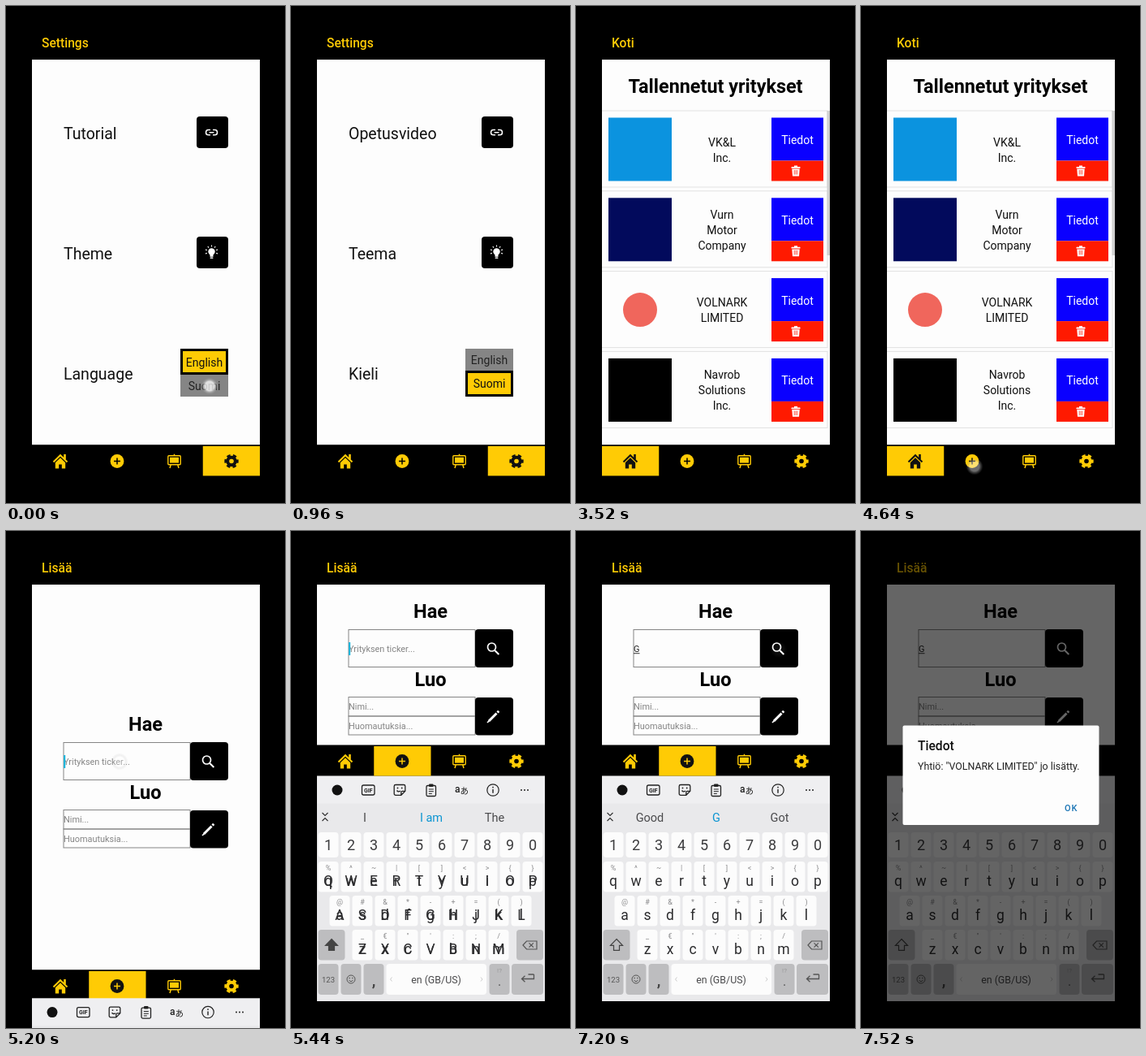
Animation of 344x612 px, one loop 8000 ms. Source, as an HTML page:

```html
<!DOCTYPE html>
<html lang="fi">
<head>
<meta charset="utf-8">
<style>
html, body { margin: 0; width: 100%; height: 100%; overflow: hidden; background: #000; }
svg { display: block; width: 344px; height: 612px; font-family: Roboto, "Noto Sans CJK JP", "Noto Sans CJK", sans-serif; }
</style>
</head>
<body>
<svg id="stage" viewBox="0 0 344 612" xmlns="http://www.w3.org/2000/svg"></svg>
<script>
const LOOP = 8000, YELLOW = '#ffcb05', KEY = '#fcfcfc', FN = '#bdbdbf';
const esc = s => s.replace(/&/g, '&amp;').replace(/</g, '&lt;');
const text = (x, y, s, size, fill = '#111', extra = '') =>
  `<text x="${x}" y="${y}" font-size="${size}" fill="${fill}" ${extra}>${esc(s)}</text>`;
const mid = (x, y, s, size, fill, extra = '') => text(x, y, s, size, fill, 'text-anchor="middle" ' + extra);
const rect = (x, y, w, h, fill, r = 0, extra = '') =>
  `<rect x="${x}" y="${y}" width="${w}" height="${h}" rx="${r}" fill="${fill}" ${extra}/>`;
const line = (d, color, w = 1.2, extra = '') =>
  `<path d="${d}" fill="none" stroke="${color}" stroke-width="${w}" ${extra}/>`;
const disc = (x, y, r, fill, extra = '') => `<circle cx="${x}" cy="${y}" r="${r}" fill="${fill}" ${extra}/>`;
const group = (id, body, extra = '') => `<g id="${id}" ${extra}>${body}</g>`;
const bold = 'font-weight="700"', medium = 'font-weight="500"';

// Settings page
function choice(id, on) {
  const a = on ? 32 : 27, top = on ? 454 : 449;
  const chosen = (y, h) => rect(216.5, y + 1.5, 56, h - 3, YELLOW, 0, 'stroke="#000" stroke-width="3"');
  return group(id, on
    ? rect(215, top, 59, 27, '#858585') + chosen(422, a) +
      mid(244.5, 443.5, 'English', 14) + mid(244.5, 473, 'Suomi', 14, '#222')
    : rect(215, 422, 59, a, '#858585') + chosen(top, 32) +
      mid(244.5, 441, 'English', 14, '#222') + mid(244.5, 470, 'Suomi', 14));
}
const labels = (id, list) => group(id, list.map((s, i) => text(71, 163.5 + 148 * i, s, 19.5)).join(''));
function rays() {
  let d = '';
  for (let i = 0; i < 7; i++) {
    const a = Math.PI * (1 + (i - 0.5) / 5), c = Math.cos(a), s = Math.sin(a);
    d += `M${253.5 + 6 * c} ${302.5 + 6 * s}L${253.5 + 8 * c} ${302.5 + 8 * s}`;
  }
  return line(d, '#fff', 1.1);
}
const settings = group('settings',
  rect(235, 136, 39, 39, '#000', 4) + rect(235, 284, 39, 39, '#000', 4) +
  line('M252 152.6h-2.4a3.1 3.1 0 0 0 0 6.2H252M255 152.6h2.4a3.1 3.1 0 0 1 0 6.2H255M250.6 155.7h5.8', '#fff', 1.5) +
  disc(253.5, 302.5, 4.2, '#fff') + rect(251.5, 305, 4, 3.8, '#fff') + rect(251.5, 309.4, 4, 1.6, '#fff', 0.8) + rays() +
  labels('english', ['Tutorial', 'Theme', 'Language']) +
  labels('finnish', ['Opetusvideo', 'Teema', 'Kieli']) +
  choice('pickEn', true) + choice('pickFi', false));

// Saved companies
const trash = y => rect(265.5, y - 5, 11, 1.8, '#fff', 0.5) + rect(269, y - 6.5, 4, 2, '#fff') +
  `<path d="M266.3 ${y - 2.4}h9.4l-.7 8.8h-8z" fill="#fff"/>` +
  line(`M269.2 ${y - 1}v5.6M271 ${y - 1}v5.6M272.8 ${y - 1}v5.6`, '#ff1a00', 0.7);
function card([name, badge], i) {
  const y = 137.5 + 98.8 * i, words = name.split('|');
  return rect(30, y - 8.5, 280, 94, '#fdfdfd', 0, 'stroke="#e2e2e2"') + badge(y) +
    words.map((s, k) => mid(180, y + 44.5 + 19 * (k - (words.length - 1) / 2), s, 14)).join('') +
    rect(241, y, 64, 53, '#0a00ff') + rect(241, y + 53, 64, 25, '#ff1a00') +
    mid(273, y + 32.5, 'Tiedot', 14, '#fff') + trash(y + 65.5);
}
const tile = color => y => rect(40, y, 78, 78, color);
const home = group('home',
  mid(172, 107, 'Tallennetut yritykset', 23.4, '#000', bold) +
  [['VK&L|Inc.', tile('#0b93df')],
   ['Vurn|Motor|Company', tile('#020a5c')],
   ['VOLNARK|LIMITED', y => disc(79, y + 39, 21, '#f0665c')],
   ['Navrob|Solutions|Inc.', tile('#000')]].map(card).join('') +
  rect(309.5, 129, 3.5, 178, '#d0d0d0'), 'clip-path="url(#screen)"');

// Add page
const box = (y, h) => rect(71, y, 156, h, 'none', 0, 'stroke="#858585"');
const add = group('add',
  mid(172, 107, 'Hae', 23.6, '#000', bold) + mid(172, 190.5, 'Luo', 23.6, '#000', bold) +
  box(121.5, 46) + box(204.5, 23.5) + box(228, 23) +
  rect(227, 121, 47, 47, '#000', 4) + rect(227, 205, 47, 46.5, '#000', 4) +
  disc(247.5, 143, 5, 'none', 'stroke="#fff" stroke-width="1.7"') + line('M251 146.7l5.3 5.3', '#fff', 2) +
  line('M244 234l9.5-9.5M254.5 223.5l1.7-1.7', '#fff', 3) + line('M242 236l2.6-2.6', '#fff', 1.6) +
  group('hint', text(71, 149, 'Yrityksen ticker...', 10.9, '#858585')) +
  group('typed', text(71, 149, 'G', 10.9, '#222') + rect(71, 150.3, 7.5, 0.9, '#222')) +
  group('caret', rect(71.2, 137, 2, 16, '#12b4dc')) +
  text(71, 220, 'Nimi...', 10.9, '#858585') + text(71, 244, 'Huomautuksia...', 10.9, '#858585'));

// Tab bar
const icons = [
  line('M58.5 561.5L67 553.2l8.5 8.3', 'currentColor', 2) + rect(71.2, 552, 2.6, 6, 'currentColor') +
    '<path d="M60.8 562.2L67 556.2l6.2 6v7.3h-4.4v-5h-3.6v5h-4.4z" fill="currentColor"/>',
  disc(137, 560.5, 8.4, 'currentColor') + line('M133 560.5h8M137 556.5v8', 'var(--back)', 1.5),
  rect(199.8, 553.7, 15.4, 11, 'none', 1, 'stroke="currentColor" stroke-width="1.4"') +
    rect(202, 555.8, 11, 6.8, 'currentColor') +
    line('M207.5 551.8v2M203.2 565l-1.2 4M211.8 565l1.2 4', 'currentColor', 1.5),
  disc(278, 560.5, 4.8, 'none', 'stroke="currentColor" stroke-width="4"') +
    disc(278, 560.5, 7.2, 'none', 'stroke="currentColor" stroke-width="3" stroke-dasharray="4.4 3.14" stroke-dashoffset="2.2"')
];
const nav = group('nav', rect(32, 540.5, 281, 38, '#000') +
  icons.map((s, i) => `<g class="tab">${rect(32 + 70.25 * i, 542, 70.25, 36.5, YELLOW)}${s}</g>`).join(''));

// Keyboard
const ROWS = [
  [46, 407, 'QWERTYUIOP', '%^~|[]<>{}'],
  [60, 449, 'ASDFGHJKL', '@#&*-+=()'],
  [88, 491, 'ZXCVBNM', '_€"\':;/']
];
const letters = (id, fold) => group(id, ROWS.map(([x, y, keys]) =>
  [...keys].map((k, i) => mid(x + 28 * i, y + 29.5, fold(k), 17.5, '#2c2c2e')).join('')).join(''));
const words = (id, list) => group(id, list.map((s, i) =>
  mid([91, 173, 251][i], 357.5, s, 14.5, i === 1 ? '#0b95d2' : '#4a4a4c')).join(''));
const keyboard = group('keyboard',
  rect(32, 302, 281, 277, '#e9e9eb') + rect(32, 302, 281, 33.5, '#efeff1') +
  disc(57, 319, 6.5, '#111') +
  rect(87.5, 313, 15.5, 12, 'none', 2, 'stroke="#222" stroke-width="1.3"') + mid(95.3, 321.7, 'GIF', 7, '#222', bold) +
  line('M129 312.5h10a1.8 1.8 0 0 1 1.8 1.8v6l-5 5H129a1.8 1.8 0 0 1-1.8-1.8v-9.2a1.8 1.8 0 0 1 1.8-1.8zM135.8 325v-3.2q0-1.5 1.5-1.5h3.3M130.5 319.5q2 2.6 4.4 .6', '#222', 1.3) +
  disc(131.5, 316.5, 0.9, '#222') + disc(136.7, 316.5, 0.9, '#222') +
  rect(167, 313.5, 11.5, 13, 'none', 1.5, 'stroke="#222" stroke-width="1.3"') + rect(170, 311.5, 5.5, 3.4, '#222', 1) +
  line('M169.8 318h6M169.8 320.7h6M169.8 323.4h4', '#222', 1) +
  text(202, 322, 'a', 12, '#222', medium) + text(208.5, 324, 'あ', 10.5, '#222', medium) +
  disc(249, 319, 7.2, 'none', 'stroke="#222" stroke-width="1.2"') + line('M249 318v4.8M249 314.8v1.6', '#222', 1.4) +
  [284, 288, 292].map(x => disc(x, 319, 1, '#222')).join('') +
  line('M38.5 347l3.5 3.4 3.5-3.4M38.5 357l3.5-3.4 3.5 3.4', '#333', 1.2) +
  words('before', ['I', 'I am', 'The']) + words('after', ['Good', 'G', 'Got']) +
  [...'1234567890'].map((k, i) => rect(33.5 + 28 * i, 371, 25, 31, KEY, 4) +
    mid(46 + 28 * i, 393, k, 18, '#3c3c3e')).join('') +
  ROWS.map(([x, y, keys, hints]) => [...hints].map((h, i) => rect(x - 12.5 + 28 * i, y, 25, 37.5, KEY, 4) +
    mid(x + 28 * i, y + 10.5, h, 9, '#8a8a8c')).join('')).join('') +
  letters('upper', k => k) + letters('lower', k => k.toLowerCase()) +
  rect(33.5, 491, 33, 37.5, FN, 4) + rect(278, 491, 33, 37.5, FN, 4) +
  '<path id="shift" d="M50 502.5l7.5 7.8h-4v6h-7v-6h-4z" stroke="#444" stroke-width="1.2"/>' +
  line('M286 510l4.5-5H303v10h-12.5zM293.5 507.3l5.4 5.4M298.9 507.3l-5.4 5.4', '#555', 1.2) +
  [33.5, 61.5, 89.5, 244.5].map(x => rect(x, 533, 25, 38, FN, 4)).join('') +
  rect(117.5, 533, 123.5, 38, KEY, 4) + rect(272, 533, 39, 38, FN, 4) +
  mid(46, 555.5, '123', 9.5, '#555') +
  disc(74, 552, 5, 'none', 'stroke="#555"') + line('M71.5 553.3q2.5 3 5 0', '#555', 1) +
  disc(72.2, 550.5, 0.8, '#555') + disc(75.8, 550.5, 0.8, '#555') +
  mid(102, 560, ',', 19, '#444', bold) + mid(257, 560, '.', 16, '#555') + mid(257, 544, '!?', 8, '#98989a') +
  mid(179, 556.5, 'en (GB/US)', 12.4, '#4a4a4c') +
  line('M124.5 549.5l-2 2.5 2 2.5M234 549.5l2 2.5-2 2.5', '#ccc', 1) +
  line('M299.5 546v5.5H285M288.5 547.8l-4 3.7 4 3.7M299.5 546h-7', '#555', 1.3));

// Message box
const dialog = group('dialog', rect(0, 0, 344, 612, '#000', 0, 'opacity=".6"') +
  rect(51.5, 239.5, 242, 122.5, '#fdfdfd', 2) +
  text(70, 270, 'Tiedot', 15.6, '#111', medium) +
  text(70, 294, 'Yhtiö: "VOLNARK LIMITED" jo lisätty.', 12.4, '#222') +
  text(251, 345, 'OK', 11, '#1b75b5', medium + ' letter-spacing=".8"'));

document.getElementById('stage').innerHTML =
  '<defs><clipPath id="screen"><rect x="32" y="66" width="281" height="475"/></clipPath>' +
  '<clipPath id="lower"><rect x="32" y="302" width="281" height="277"/></clipPath>' +
  '<radialGradient id="glow"><stop offset=".55" stop-color="#fff" stop-opacity=".75"/>' +
  '<stop offset=".75" stop-color="#bbb" stop-opacity=".5"/><stop offset="1" stop-color="#999" stop-opacity="0"/></radialGradient></defs>' +
  rect(0, 0, 344, 612, '#000') + rect(32, 66, 281, 474.5, '#fdfdfd') +
  text(44, 51, '', 15.6, YELLOW, medium + ' id="title"') +
  settings + home + add + nav + `<g clip-path="url(#lower)">${keyboard}</g>` + dialog +
  disc(0, 0, 10.5, 'url(#glow)', 'id="touch"');

const $ = id => document.getElementById(id);
const tabs = [...document.querySelectorAll('.tab')];
const show = (id, on) => { $(id).style.display = on ? '' : 'none'; };
const move = (id, x, y) => $(id).setAttribute('transform', `translate(${x} ${y})`);
const clamp = v => Math.max(0, Math.min(1, v));
const ramp = (t, a, b) => clamp((t - a) / (b - a));

const AT = { finnish: 240, home: 2960, add: 4720, keys: 5200, type: 6240, suggest: 6320, dialog: 7280 };
// x, y, press, release
const TAPS = [
  [251, 468, -100, 120], [60, 564.5, 2750, 2900], [140, 567, 4590, 4720],
  [140, 284, 5020, 5120], [173, 470, 6080, 6200], [250, 146, 6960, 7080]
];

function render(t) {
  const page = t < AT.home ? 3 : t < AT.add ? 0 : 1;
  const finnish = t >= AT.finnish, typed = t >= AT.type;
  const up = t >= AT.keys + 80, slide = 1 - (1 - ramp(t, AT.keys, AT.keys + 160)) ** 2;

  $('title').textContent = ['Koti', 'Lisää', '', 'Settings'][page];
  show('settings', page === 3);
  show('home', page === 0);
  show('add', page === 1);
  show('english', !finnish);
  show('pickEn', !finnish);
  show('finnish', finnish);
  show('pickFi', finnish);

  tabs.forEach((tab, i) => {
    const on = i === page;
    tab.firstChild.style.display = on ? '' : 'none';
    tab.style.color = on ? '#111' : YELLOW;
    tab.style.setProperty('--back', on ? YELLOW : '#000');
  });
  move('nav', 0, up ? -277 : 0);
  move('add', 0, up ? 0 : 139);
  show('keyboard', t >= AT.keys);
  move('keyboard', 0, 277 * (1 - slide));

  show('hint', !typed);
  show('typed', typed);
  show('upper', !typed);
  show('lower', typed);
  show('before', t < AT.suggest);
  show('after', t >= AT.suggest);
  $('shift').setAttribute('fill', typed ? 'none' : '#444');
  const blink = (t - (typed ? AT.type : AT.keys)) % 1000;
  show('caret', t >= AT.keys && t < AT.dialog && blink < 500);
  move('caret', typed ? 7.6 : 0, 0);

  show('dialog', t >= AT.dialog);
  $('dialog').setAttribute('opacity', ramp(t, AT.dialog, AT.dialog + 180));

  const tap = TAPS.find(([, , a, b]) => t >= a && t < b + 130);
  show('touch', !!tap);
  if (tap) {
    const [x, y, a, b] = tap;
    move('touch', x, y);
    $('touch').setAttribute('opacity', ramp(t, a, a + 90) * (1 - ramp(t, b, b + 130)));
  }
}

const start = performance.now();
function tick() {
  render((performance.now() - start) % LOOP);
  requestAnimationFrame(tick);
}
tick();
</script>
</body>
</html>
```
